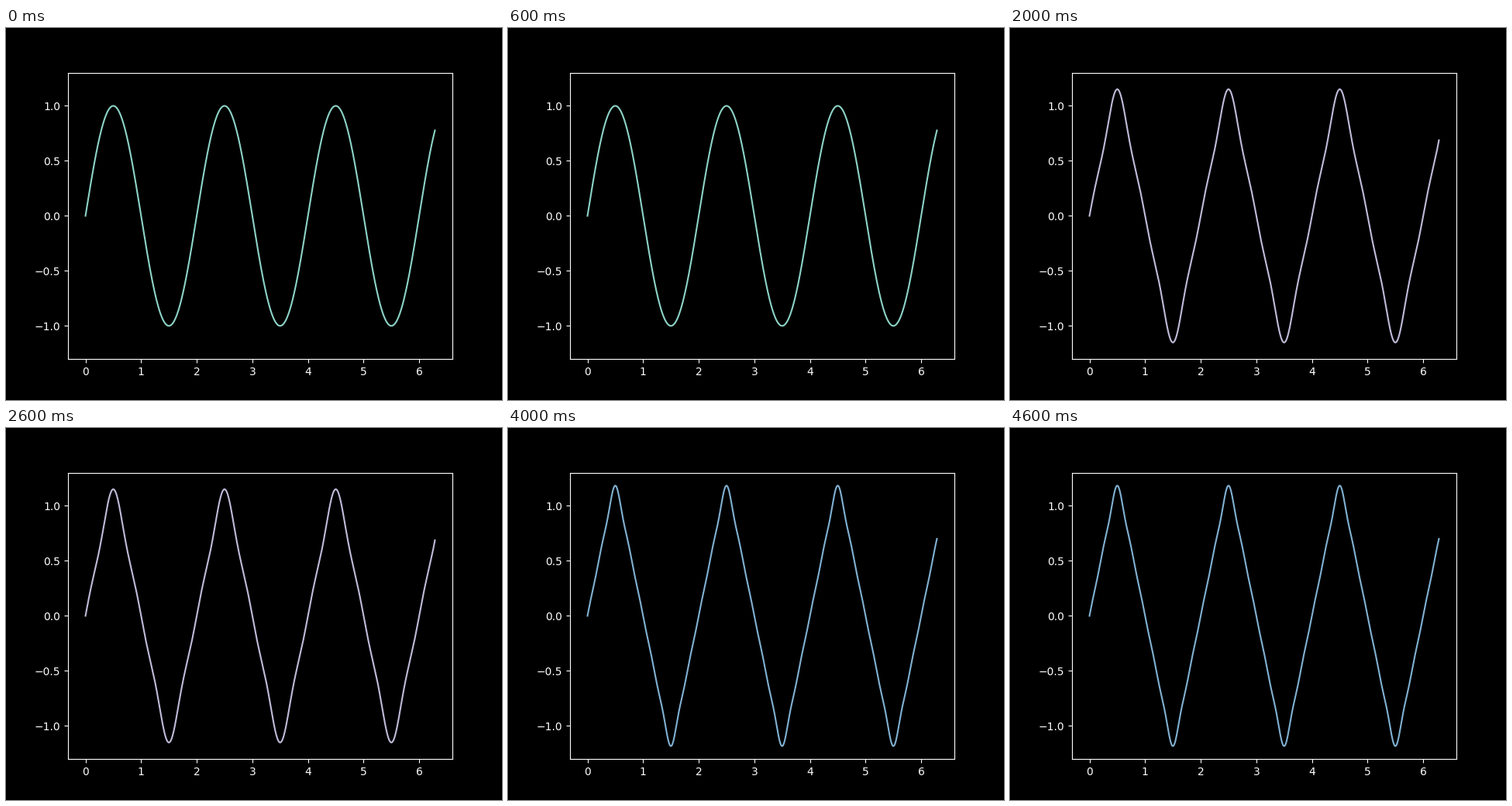
A matplotlib script that plays this animation: 640x480 px, repeating every 5 s.

```python
import matplotlib.pyplot as plt
import numpy as np
from matplotlib.animation import ArtistAnimation

TERMS = 5

plt.style.use("dark_background")
fig, ax = plt.subplots(figsize=(6.4, 4.8), dpi=100)

# Partial Fourier sums of a triangle wave, one more harmonic per step
x = np.linspace(0, 2 * np.pi, 1000)
y = np.zeros_like(x)
steps = []
for k in range(TERMS):
    n = 2 * k + 1
    y = y + (-1) ** k * np.sin(n * np.pi * x) / n**2
    steps.append(ax.plot(x, y, color=f"C{k}"))

anim = ArtistAnimation(fig, steps, interval=1000, repeat=True, repeat_delay=0)
plt.show()
```
